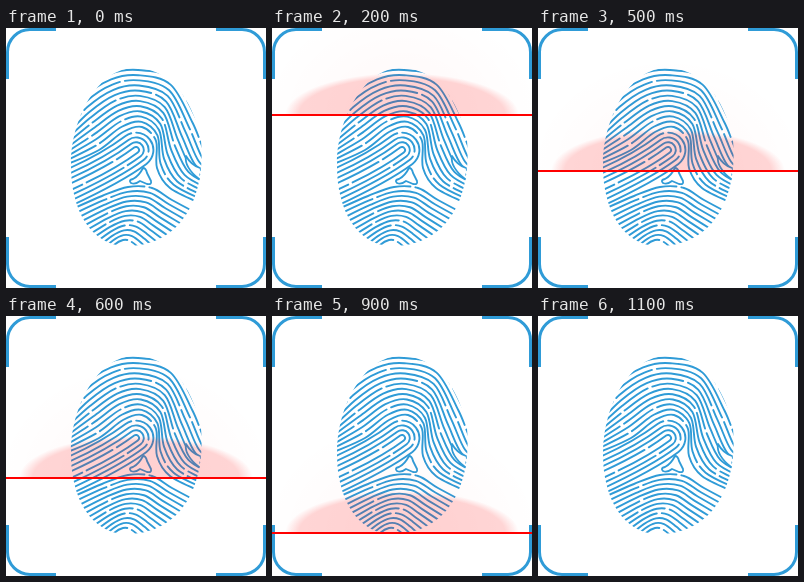
These frames come from a looping animation (260x260 px, 1200 ms). An HTML page:

```html
<!DOCTYPE html>
<html lang="en">
<head>
<meta charset="utf-8">
<title>Fingerprint scan</title>
<style>
  html, body { margin: 0; width: 100%; height: 100%; overflow: hidden; background: #fff; }
  svg { display: block; width: 100vw; height: 100vh; }
</style>
</head>
<body>
<svg viewBox="0 0 260 260">
  <defs>
    <clipPath id="outline">
      <path d="M128 40C162 40 186 68 195 112C200 170 175 218 121 218C84 218 64 180 65 135C66 85 95 40 128 40Z"/>
    </clipPath>
    <clipPath id="aboveLine"><rect y="-117" width="260" height="117"/></clipPath>
    <radialGradient id="domeFill">
      <stop offset=".88" stop-color="#f00" stop-opacity=".16"/>
      <stop offset="1" stop-color="#f00" stop-opacity="0"/>
    </radialGradient>
    <radialGradient id="hazeFill">
      <stop offset="0" stop-color="#f00" stop-opacity=".03"/>
      <stop offset="1" stop-color="#f00" stop-opacity="0"/>
    </radialGradient>
  </defs>
  <g fill="none" stroke="#2f9bd7" stroke-linecap="round" stroke-linejoin="round">
    <g id="print" stroke-width="1.9" clip-path="url(#outline)"></g>
    <g stroke-width="1.8" fill="#fff">
      <path d="M137 140Q140 140 141 145L145 153Q146 157 141 156L134 153Q129 157 125 155Q122 152 127 151Q133 148 137 140Z"/>
      <path d="M194 140Q185 137 180 128Q178 139 193 151"/>
    </g>
    <g id="corners" stroke-width="3" stroke-linecap="butt"></g>
  </g>
  <g id="scan">
    <g clip-path="url(#aboveLine)">
      <ellipse cx="130" rx="140" ry="115" fill="url(#hazeFill)"/>
      <ellipse cx="130" rx="117" ry="42" fill="url(#domeFill)"/>
    </g>
    <rect y="-1" width="260" height="2" fill="#f00"/>
  </g>
</svg>
<script>
  const byId = id => document.getElementById(id);

  function addPath(parent, attrs) {
    const path = document.createElementNS('http://www.w3.org/2000/svg', 'path');
    for (const key in attrs) path.setAttribute(key, attrs[key]);
    parent.append(path);
  }

  let seed = 11;
  function random() {
    seed = (seed * 16807) % 2147483647;
    return seed / 2147483647;
  }

  // A ridge with a small break at a random place.
  function addRidge(d) {
    const dash = 90 + random() * 90;
    addPath(byId('print'), {
      d,
      'stroke-dasharray': `${dash} 5`,
      'stroke-dashoffset': random() * dash
    });
  }

  // Catmull-Rom spline through the points.
  function smooth(points) {
    const at = i => points[Math.max(0, Math.min(points.length - 1, i))];
    const handle = (p, a, b) => p.map((v, k) => v + (b[k] - a[k]) / 6);
    let d = 'M' + points[0];
    for (let i = 0; i < points.length - 1; i++) {
      const first = handle(at(i), at(i - 1), at(i + 1));
      const second = handle(at(i + 1), at(i + 2), at(i));
      d += `C${first} ${second} ${at(i + 1)}`;
    }
    return d;
  }

  // Ridges blended evenly from one guide curve to another.
  function addRidges(from, to, count) {
    for (let n = 0; n < count; n++) {
      const t = n / (count - 1);
      addRidge(smooth(from.map((p, i) => p.map((v, k) => v + (to[i][k] - v) * t))));
    }
  }

  // Hairpin at distance r from a curved axis that ends at the core.
  function addLoop(r) {
    const side = s => ({
      far: [62, 160 + s * r * 1.1],
      bend: [106 + s * r * 0.6, 140 + s * r * 0.8],
      tip: [130 + s * r * 0.6, 122 + s * r * 0.8]
    });
    const upper = side(-1), lower = side(1);
    addRidge(`M${upper.far}Q${upper.bend} ${upper.tip}A${r} ${r} 0 0 1 ${lower.tip}Q${lower.bend} ${lower.far}`);
  }

  for (let n = 0; n < 4; n++) addLoop(3 + 4.8 * n);

  // Arches over the loops, running down the right side.
  addRidges(
    [[62, 136], [93, 122], [117, 104], [136, 99], [150, 113], [151, 140], [164, 160], [196, 176]],
    [[58, 92], [77, 63], [104, 46], [132, 42], [166, 51], [190, 90], [204, 124], [214, 134]],
    12
  );

  // Arches below the delta.
  addRidges(
    [[62, 183], [96, 168], [122, 159], [146, 160], [166, 172], [196, 188]],
    [[98, 228], [108, 217], [117, 212], [124, 213], [132, 219], [142, 230]],
    12
  );

  for (const x of [-1, 1]) {
    for (const y of [-1, 1]) {
      addPath(byId('corners'), {
        d: 'M-128.5-79V-106A22.5 22.5 0 0 1-106-128.5H-80',
        transform: `translate(130 130) scale(${x} ${y})`
      });
    }
  }

  const STEP = 100;
  const STEPS = 12;
  const scan = byId('scan');

  // The line slows slightly over the last stretch.
  const lineY = step => Math.round(step < 7 ? 49 + 18.8 * step : 64 + 17 * step);

  function render(time) {
    const step = Math.floor(time / STEP) % STEPS;
    const scanning = step > 0 && step < STEPS - 1;
    scan.setAttribute('visibility', scanning ? 'visible' : 'hidden');
    scan.setAttribute('transform', `translate(0 ${lineY(step)})`);
  }

  const start = performance.now();
  function tick() {
    render(performance.now() - start);
    requestAnimationFrame(tick);
  }
  tick();
</script>
</body>
</html>
```
